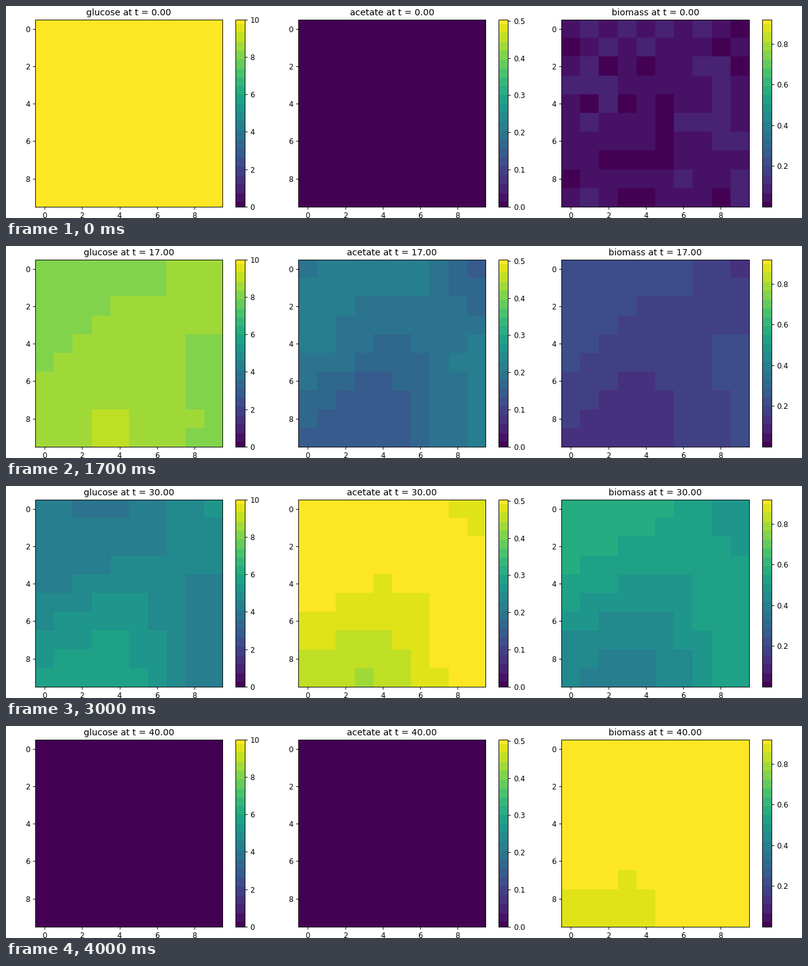
Write a matplotlib script that moves like this. It is 1280 px wide and 341 px high and loops after 4.1 s.

```python
import numpy as np
import matplotlib.pyplot as plt
from matplotlib.animation import FuncAnimation
from matplotlib.colors import ListedColormap

W, H = 1280, 341
DPI = W / 15
FRAMES, INTERVAL = 41, 100

N = 10               # cells per side
INOCULUM = 0.0487    # mean biomass at the start
GROWTH = 0.0775      # per unit of time
DIFFUSION = 0.1
CAPACITY = 0.855     # biomass that the glucose can feed
SOFTNESS = 0.02      # how gently growth stops there

SIZE = 301.2         # side of a map in pixels
BAR = SIZE / 20
TOP = 21.7

plt.rcParams.update({"font.family": "DejaVu Sans", "font.size": 10})

# Cosine modes of the inoculum: a few broad ones over random fine grain
rng = np.random.default_rng(4)
modes = rng.normal(0, 0.1, (N, N))
modes[:3, :3] = [[1.0, -0.02, 0.10],
                 [0.125, 0.19, -0.25],
                 [-0.045, 0.0, -0.25]]
k = np.arange(N)
basis = np.cos(np.pi * np.outer((k + 0.5) / N, k))
decay_rate = DIFFUSION * (np.pi / N) ** 2 * (k[:, None] ** 2 + k ** 2)


def fields(t):
    """Glucose, acetate and biomass maps at time t."""
    seed = INOCULUM * basis @ (modes * np.exp(-decay_rate * t)) @ basis.T
    seed = np.clip(seed, 0.003, 0.1)
    grown = seed * np.expm1(GROWTH * t)
    grown = -SOFTNESS * np.logaddexp(-grown / SOFTNESS,
                                     -CAPACITY / SOFTNESS)
    glucose = 10 * (1 - grown / CAPACITY)
    # Overflow product: released while glucose lasts, then taken up again
    acetate = 1.4 * grown * (1 - (np.maximum(grown, 0) / 0.81) ** 2.6)
    return glucose, np.maximum(acetate, 0), seed + grown


def banded_viridis(bands=22):
    x = np.linspace(0, 1, 512)
    steps = np.rint(x * (bands - 1)) / (bands - 1)
    return ListedColormap(plt.get_cmap("viridis")(steps))


def pixel_axes(x, w):
    return fig.add_axes([x / W, 1 - (TOP + SIZE) / H, w / W, SIZE / H])


def add_panel(column, vmax, tick_step):
    x = 47 + 423.2 * column
    ax = pixel_axes(x, SIZE)
    im = ax.imshow(np.zeros((N, N)), cmap=cmap, vmin=0, vmax=vmax,
                   aspect="auto")
    ax.set_xticks(range(0, N, 2))
    ax.set_yticks(range(0, N, 2))
    first = tick_step if column == 2 else 0
    fig.colorbar(im, cax=pixel_axes(x + 322.2, BAR),
                 ticks=np.arange(first, vmax + 1e-6, tick_step))
    return im, ax.set_title("", fontsize=12)


fig = plt.figure(figsize=((W + 0.001) / DPI, (H + 0.001) / DPI), dpi=DPI,
                 facecolor="white")
cmap = banded_viridis()
names = ("glucose", "acetate", "biomass")
panels = [add_panel(0, 10, 2), add_panel(1, 0.5034, 0.1),
          add_panel(2, 0.92, 0.2)]


def update(i):
    for (im, title), name, field in zip(panels, names, fields(i)):
        im.set_data(field)
        title.set_text(f"{name} at t = {i:.2f}")
    return [artist for panel in panels for artist in panel]


anim = FuncAnimation(fig, update, frames=FRAMES, interval=INTERVAL,
                     init_func=lambda: update(0), repeat=True,
                     repeat_delay=0, blit=False)
plt.show()
```
